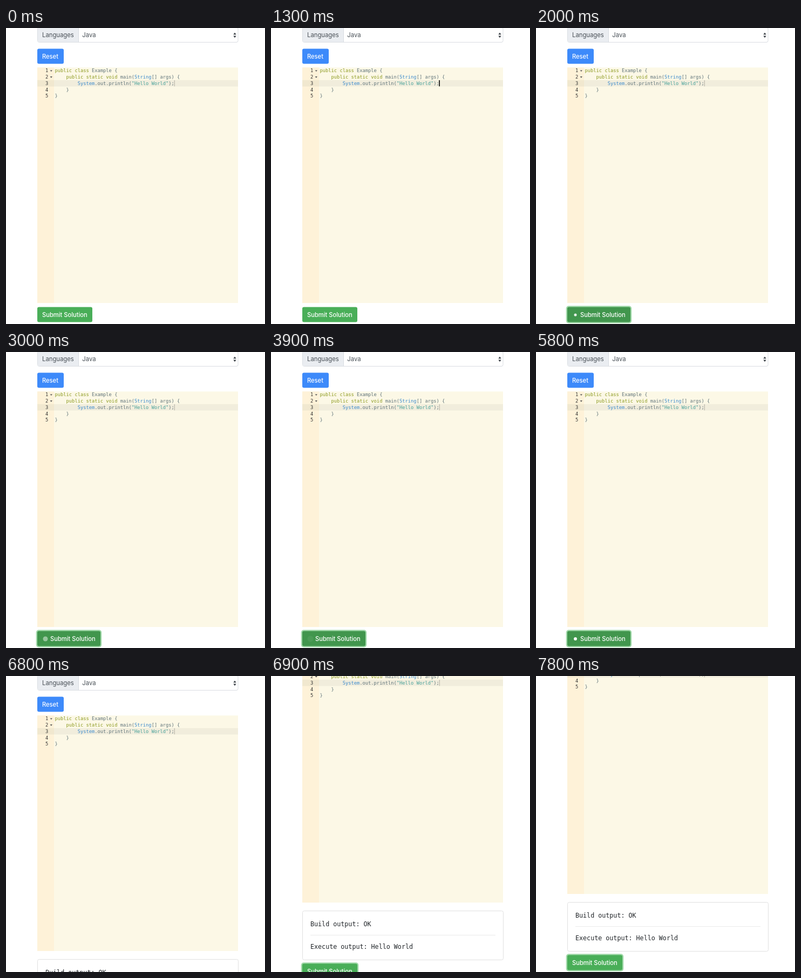
An HTML page for the animation above (8.4 s loop, 480 by 550 pixels).

```html
<!DOCTYPE html>
<html lang="en">
<head>
<meta charset="utf-8">
<title>Code runner</title>
<style>
  html, body { margin: 0; width: 100%; height: 100%; overflow: hidden; background: #fff; }
  svg { display: block; width: 480px; height: 550px; }
  text { white-space: pre; }
  .ui { font: 11.3px Inter, Roboto, sans-serif; fill: #495057; }
  .button { font-size: 11.15px; font-weight: 500; fill: #fff; }
  .code { font: 8.75px "DejaVu Sans Mono", monospace; fill: #5f7379; }
  .number { fill: #333; text-anchor: end; }
  .keyword { fill: #8c9a1f; }
  .type { fill: #3d8bcd; }
  .string { fill: #47a199; }
  .output { font: 11.7px "DejaVu Sans Mono", monospace; fill: #212529; }
</style>
</head>
<body>
<svg viewBox="0 0 480 550">
  <g id="page">
    <rect x="58.5" y="-1.5" width="371.5" height="28" rx="3" fill="#fff" stroke="#d9dde2"/>
    <path d="M134.5 -1V26H61.5Q59 26 59 23.5V-1Z" fill="#eaedf1"/>
    <path d="M134.5 -1V26" stroke="#d9dde2"/>
    <text class="ui" x="67" y="17.3">Languages</text>
    <text class="ui" x="141.3" y="17.3">Java</text>
    <path d="M421.3 12.2L424 8.4L426.7 12.2ZM421.3 14.4L424 18.2L426.7 14.4Z" fill="#3b4046"/>

    <rect x="58" y="38.6" width="49" height="27.8" rx="3" fill="#3d8afa"/>
    <text class="ui button" x="67" y="56.6">Reset</text>

    <rect x="58" y="73.4" width="372" height="437.6" fill="#fcf8e6"/>
    <rect x="58" y="73.4" width="31" height="437.6" fill="#fef2d8"/>
    <rect x="89" y="96.8" width="341" height="11.8" fill="#f1eddc"/>
    <rect x="58" y="96.8" width="31" height="11.8" fill="#f1e8cf"/>
    <g id="code"></g>
    <rect id="caret" y="97" height="11.4"/>

    <g id="result">
      <rect x="58.5" y="526.5" width="372" height="91" rx="3" fill="#fff" stroke="#e0e0e0"/>
      <path d="M73 571.5H416" stroke="#eaeaea"/>
      <text class="output" x="73" y="555">Build output: OK</text>
      <text class="output" x="73" y="597.2">Execute output: Hello World</text>
    </g>

    <g id="submit">
      <rect id="ring" x="55.7" y="516.3" width="106.6" height="32.4" rx="5" fill="#a2d9aa"/>
      <rect id="face" x="58" y="518.6" width="102" height="27.8" rx="3"/>
      <circle id="dot" cx="73" cy="533" fill="#fff"/>
      <text id="label" class="ui button" y="536.8">Submit Solution</text>
    </g>
  </g>
</svg>
<script>
const LOOP = 8400, TICK = 100;
const FOCUS = 1000, HOVER = 1500, CLICK = 1600, SPIN = 1672, DONE = 6000;
const RESULT_SHIFT = 106;
const SCROLL = [[6900, 90], [7000, 102], [7100, 105], [7200, 106]];

const $ = id => document.getElementById(id);
const set = (id, attrs) => {
  for (const name in attrs) $(id).setAttribute(name, attrs[name]);
};
const show = (id, on) => set(id, { visibility: on ? 'visible' : 'hidden' });

// Each line is a list of [style, text] runs.
const LINES = [
  [['keyword', 'public class'], ['', ' Example {']],
  [['keyword', '    public static void'], ['', ' main('], ['type', 'String'], ['', '[] args) {']],
  [['type', '        System'], ['', '.out.println('], ['string', '"Hello World"'], ['', ');']],
  [['', '    }']],
  [['', '}']]
];
$('code').innerHTML = LINES.map((runs, i) => {
  const y = 82.4 + i * 11.7;
  const spans = runs.map(([style, text]) => `<tspan class="${style}">${text}</tspan>`).join('');
  const fold = i < 2 ? `<path d="M81.6 ${y - 4}h4.4l-2.2 2.6Z" fill="#555"/>` : '';
  return `<text class="code number" x="78.4" y="${y}">${i + 1}</text>${fold}` +
    `<text class="code" x="90.5" y="${y}">${spans}</text>`;
}).join('');

function draw(t) {
  const focused = t >= FOCUS && t < CLICK;
  set('caret', focused
    ? { x: 311.3, width: 1.6, fill: '#000' }
    : { x: 311.8, width: 0.9, fill: '#a9a69b' });

  const busy = t >= SPIN && t < DONE;
  const done = t >= DONE;
  const scroll = SCROLL.reduce((y, [at, to]) => t >= at ? to : y, 0);
  set('page', { transform: `translate(0 ${-scroll})` });
  set('submit', { transform: `translate(0 ${done ? RESULT_SHIFT : 0})` });
  show('result', done);

  const width = busy ? 117 : 102;
  set('face', { width, fill: t >= HOVER && !done ? '#41964d' : '#49ae58' });
  set('ring', { width: width + 4.6 });
  show('ring', t >= CLICK);
  set('label', { x: busy ? 82 : 67 });

  // The dot grows steadily while its opacity rises and falls.
  const phase = busy ? (t - SPIN) % 750 / 750 : 0;
  set('dot', { r: 5.85 * phase, opacity: 1 - Math.abs(2 * phase - 1) });
}

const start = performance.now();
function frame() {
  const t = (performance.now() - start) % LOOP;
  draw(Math.floor(t / TICK) * TICK);
  requestAnimationFrame(frame);
}
frame();
</script>
</body>
</html>
```
